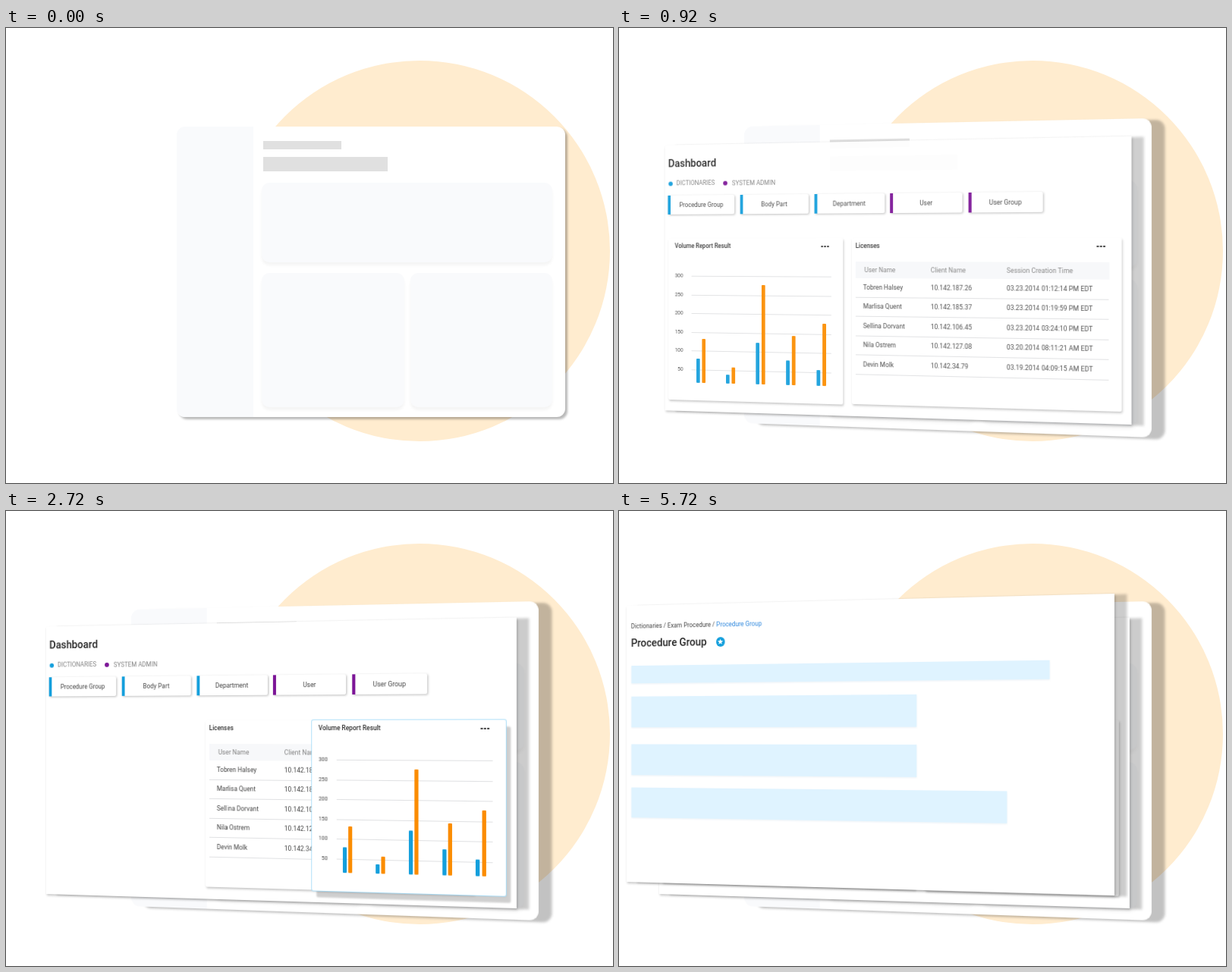
Animation, 800 px wide and 600 px high, one loop 5760 ms. Source, as an HTML page:

```html
<!DOCTYPE html>
<html lang="en">
<head>
<meta charset="utf-8">
<title>Dashboard</title>
<style>
html, body { margin: 0; width: 100%; height: 100%; overflow: hidden; background: #fff; }
#stage { position: relative; width: 800px; height: 600px; overflow: hidden; }
#stage * { position: absolute; box-sizing: border-box; }
#circle { left: 294px; top: 43px; width: 502px; height: 502px; border-radius: 50%; background: #ffeccf; }
.sheet { left: 0; top: 0; transform-origin: 0 0; background: #fff; }
#card { width: 512px; height: 383px; border-radius: 11px; }
#dash { width: 620px; height: 364px; }
#page { width: 643px; height: 377px; }
#dash, #page { box-shadow: 15px 1px 3px rgba(0,0,0,.2), 1px 2px 3px rgba(0,0,0,.22); }
.tile { background: #f9fafc; border-radius: 10px; box-shadow: 0 4px 4px rgba(0,0,0,.045); }
.side { background: #f9fafc; border-radius: 11px 0 0 11px; }
.grey { background: #e0e0e0; }
.pale { background: #dff3ff; box-shadow: 0 1px 2px rgba(120,160,190,.15); }
.blue { background: #149fdc; }
.purple { background: #7c1597; }
.orange { background: #fb8c00; }
.dot { border-radius: 50%; }
.dark { background: #333; }
.line { background: #e0e1e3; }
.band { background: #f7f8fa; }
.button { background: #fff; border-radius: 2px; box-shadow: 1px 1px 3px rgba(0,0,0,.27); }
.panel { background: #fff; box-shadow: 1px 2px 3px rgba(0,0,0,.22); border-radius: 2px; }
.bar { border-radius: 1px; }
.star { background: #fff; clip-path: polygon(50% 0, 63% 34%, 98% 36%, 70% 58%, 80% 93%, 50% 73%, 20% 93%, 30% 58%, 2% 36%, 37% 34%); }
.text { font: 8.4px Roboto, Arial, sans-serif; line-height: 0; height: 0; white-space: pre; color: #444; }
#stage .text span { position: static; color: #2b86dd; }
#stage .head { font-size: 14.2px; font-weight: 500; color: #222; line-height: 0; }
#stage .title { font-size: 8.2px; font-weight: 500; color: #333; line-height: 0; }
.soft { color: #808080; }
.axis { font-size: 7px; line-height: 0; width: 20px; text-align: right; }
.mid { text-align: center; width: 95px; }
</style>
</head>
<body>
<div id="stage">
  <div id="circle"></div>
  <div id="card" class="sheet"></div>
  <div id="dash" class="sheet"></div>
  <div id="page" class="sheet"></div>
</div>
<script>
const $ = id => document.getElementById(id);
const box = (cls, x, y, w, h, inner = '', id = '') =>
  `<div id="${id}" class="${cls}" style="left:${x}px;top:${y}px;width:${w}px;height:${h}px">${inner}</div>`;
const text = (x, y, str, cls = '') => `<div class="text ${cls}" style="left:${x}px;top:${y}px">${str}</div>`;
const dot = (cls, x, y, r) => box('dot ' + cls, x - r, y - r, 2 * r, 2 * r);
const menu = (x, y) => [-4, 0, 4].map(d => dot('dark', x + d, y, 1.4)).join('');

// Placeholder layout
$('card').innerHTML = box('side', 0, 0, 101, 383) +
  box('grey', 114, 19, 103, 11) + box('grey', 114, 40, 164, 19) +
  box('tile', 112, 74, 383, 105) + box('tile', 112, 193, 188, 177) + box('tile', 308, 193, 187, 177);

// Dashboard
function chart() {
  let out = text(8.7, 10.3, 'Volume Report Result', 'title') + menu(219, 11.5);
  for (let i = 0; i < 6; i++) {
    const y = 51.6 + 25.5 * i;
    out += text(0.6, y, 300 - 50 * i, 'axis') + box('line', 32.5, y, 195.5, 1);
  }
  const blue = [33, 12, 56, 33, 21.5], orange = [60, 22, 134, 66, 83];
  blue.forEach((h, i) => {
    const x = 40 + 41.9 * i, base = 197.5;
    out += box('bar blue', x, base - h, 5, h) + box('bar orange', x + 7.6, base - orange[i], 5, orange[i]);
  });
  return out;
}

function licenses() {
  const cols = [15.4, 105.2, 203.5];
  const rows = [
    ['Tobren Halsey', '10.142.187.26', '03.23.2014 01:12:14 PM EDT'],
    ['Marlisa Quent', '10.142.185.37', '03.23.2014 01:19:59 PM EDT'],
    ['Sellina Dorvant', '10.142.106.45', '03.23.2014 03:24:10 PM EDT'],
    ['Nila Ostrem', '10.142.127.08', '03.20.2014 08:11:21 AM EDT'],
    ['Devin Molk', '10.142.34.79', '03.19.2014 04:09:15 AM EDT']
  ];
  let out = text(5.2, 10.6, 'Licenses', 'title') + menu(322, 11.6) + box('band', 5, 31, 327, 22) +
    text(17.3, 42.3, 'User Name', 'soft') + text(105.2, 42.3, 'Client Name', 'soft') +
    text(203.5, 42.3, 'Session Creation Time', 'soft');
  rows.forEach((row, i) => {
    const y = 65 + 25.5 * i;
    out += row.map((s, k) => text(cols[k], y, s)).join('') + box('line', 5, y + 13, 326, 1);
  });
  return out;
}

const buttons = ['Procedure Group', 'Body Part', 'Department', 'User', 'User Group'];
$('dash').innerHTML = text(4.4, 25, 'Dashboard', 'head') +
  dot('blue', 7.6, 53, 3) + text(16.3, 52.3, 'DICTIONARIES', 'soft') +
  dot('purple', 86, 52.7, 3) + text(95.6, 52.5, 'SYSTEM ADMIN', 'soft') +
  buttons.map((name, i) => box('button', 4.4 + 102.6 * i, 68.5, 95, 26,
    box(i < 3 ? 'blue' : 'purple', 0, 0, 4, 26) + text(0, 13, name, 'mid'), 'button' + i)).join('') +
  box('panel', 260.5, 127.5, 347.5, 220.5, licenses(), 'licenses') +
  box('panel', 5.4, 127.5, 244, 221, chart(), 'chart');

// Detail page
$('page').innerHTML =
  text(6.5, 28.2, 'Dictionaries / Exam Procedure / <span>Procedure Group</span>') +
  text(6.5, 51, 'Procedure Group', 'head') +
  dot('blue', 132.7, 51.5, 6.2) + box('star', 128.7, 47.4, 8, 8) +
  box('pale', 6.5, 82.2, 557, 24.3) + box('pale', 6.5, 124.3, 389, 41.4) +
  box('pale', 6.5, 188.5, 389, 42) + box('pale', 6.5, 247.5, 504, 41.4);

// Quads: left x, right x, left top, left bottom, right top, right bottom
const FLAT = [225, 737, 130, 513, 130, 513], TILT = [165, 702, 130, 521, 119, 540];
const DASH_FROM = [175.3, 712.8, 187.2, 492.8, 176.8, 509.3], DASH = [53, 673, 152.5, 505, 140.5, 524];
const PAGE = [10, 653, 125, 489, 109, 507], PAGE_FROM = PAGE.map((v, i) => i < 2 ? v : v + 30);

const lerp = (a, b, p) => a + (b - a) * p;
const span = (t, from, to) => Math.min(1, Math.max(0, (t - from) / (to - from)));
const smooth = p => p * p * (3 - 2 * p);
const out = (p, n) => 1 - (1 - p) ** n;
const drag = p => p < .43 ? (p / .43) ** 3 / 2 : 1 - ((1 - p) / .57) ** 4 / 2;

// Projects the flat sheet onto a quad with vertical sides
function place(el, from, to, p) {
  const [x0, x1, a, b, c, d] = from.map((v, i) => lerp(v, to[i], p));
  const w = el.offsetWidth, h = el.offsetHeight, r = (b - a) / (d - c);
  const m = [(x1 * r - x0) / w, (r * c - a) / w, 0, (r - 1) / w, 0, (b - a) / h, 0, 0, 0, 0, 1, 0, x0, a, 0, 1];
  el.style.transform = `matrix3d(${m.map(v => v.toFixed(8))})`;
}

function fade(el, p) {
  el.style.opacity = p;
  el.style.visibility = p > 0 ? 'visible' : 'hidden';
}

function draw(t) {
  const tilt = smooth(span(t, 0, 600));
  place($('card'), FLAT, TILT, tilt);
  $('card').style.boxShadow = `${lerp(3, 15.5, tilt)}px ${lerp(3, 2, tilt)}px 3px rgba(0,0,0,${lerp(.28, .24, tilt)})`;

  const enter = out(span(t, 600, 1200), 3.6);
  place($('dash'), DASH_FROM, DASH, enter);
  fade($('dash'), enter);

  const lift = smooth(span(t, 1440, 1740)) - smooth(span(t, 2640, 2970));
  $('chart').style.left = 5.4 + 357.5 * drag(span(t, 1800, 2640)) + 'px';
  $('chart').style.boxShadow = `0 0 0 1px rgba(165,220,248,${lift}), ` +
    `${7 * lift}px ${10 * lift}px 2px rgba(0,0,0,${.22 * lift}), 1px 2px 3px rgba(0,0,0,${.22 * (1 - lift)})`;
  $('licenses').style.left = 260.5 - 257 * smooth(span(t, 2640, 2970)) + 'px';

  const hover = smooth(span(t, 3440, 3690));
  $('button0').style.boxShadow = `1px ${1 + 2 * hover}px ${3 + hover}px rgba(0,0,0,${.27 + .13 * hover})`;

  const open = out(span(t, 3840, 4280), 2);
  place($('page'), PAGE_FROM, PAGE, open);
  fade($('page'), open);
}

function tick() {
  draw(performance.now() % 5760);
  requestAnimationFrame(tick);
}
tick();
</script>
</body>
</html>
```
